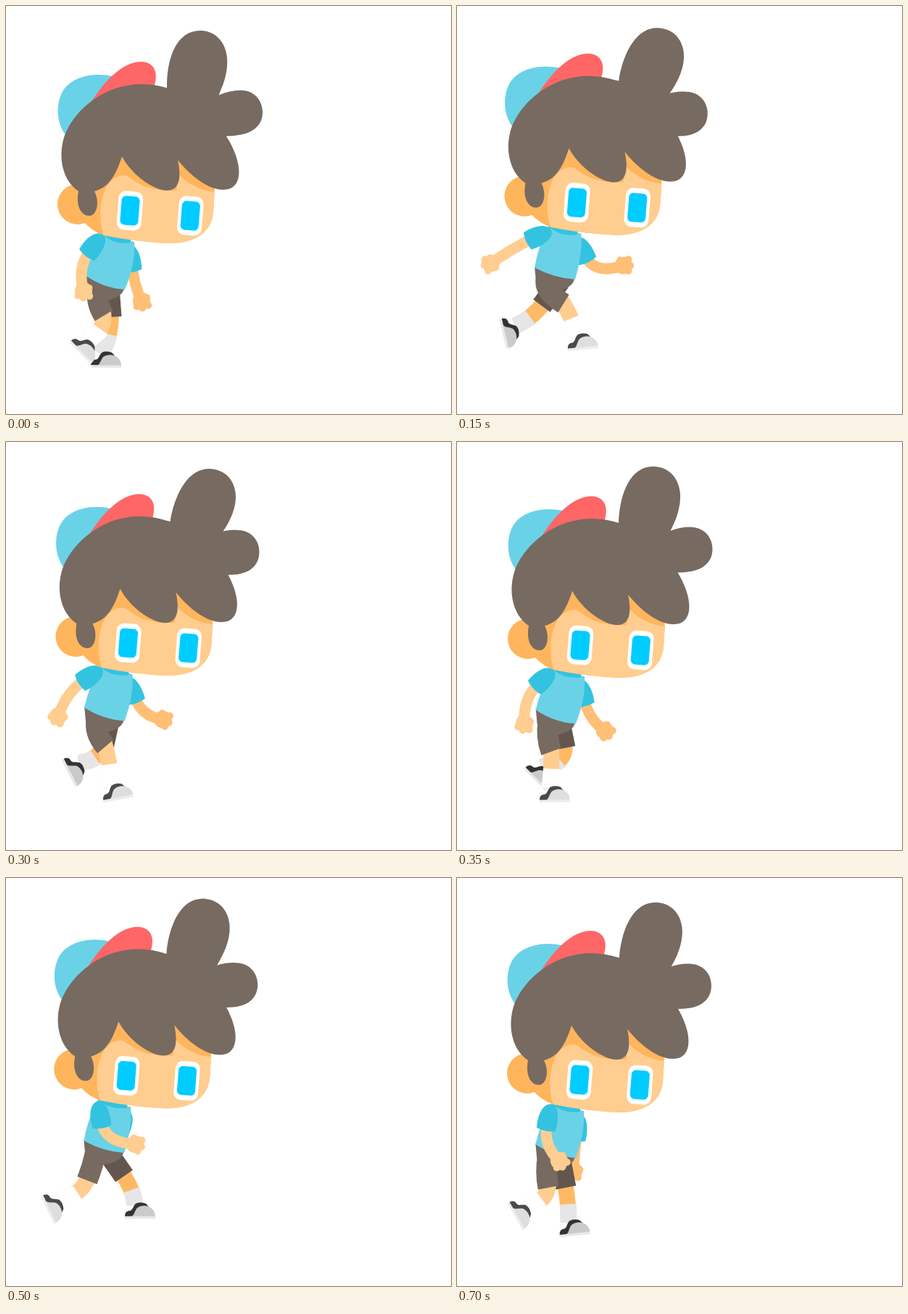
An HTML page with a canvas that plays this animation: 614 px wide and 564 px high, repeating every 0.75 s.

```html
<!DOCTYPE html>
<html lang="en">
<head>
<meta charset="utf-8">
<title>Walk cycle</title>
<style>
  html, body { margin: 0; width: 100%; height: 100%; overflow: hidden; background: #fff; }
  canvas { display: block; }
</style>
</head>
<body>
<canvas id="stage" width="614" height="564"></canvas>
<script>
const ctx = document.getElementById('stage').getContext('2d');
const STEP = 50, STEPS = 15;

const HAIR = '#776a61', SKIN = '#ffcd8f', SHADE = '#ffb55c', BLUE = '#6ad2e7', TEAL = '#33c3e0';
const NEAR = { skin: SKIN, leg: SKIN, shorts: HAIR, sock: '#fff', shoe: '#4a4a4a', toe: '#dedede', sole: '#ededed' };
const FAR = { skin: '#ffbf75', leg: '#ffb964', shorts: '#62564f', sock: '#e6e6e6', shoe: '#333', toe: '#cacaca', sole: '#e8e8e8' };

// Key poses, in steps of the cycle
const KEYS = [0, 2, 3.5, 5, 7, 10, 12, 14];
// rise of the body, sway of the top tuft, sway of the side tuft
const BODY = [
  [0, 0, 0], [8.3, 6.5, 5], [11.8, 13, 7], [9.6, 20, 9],
  [2, 3, 1.5], [9.6, 6.5, 5], [12, 19, 9], [4, 6, 3]
];
// knee x, y; sole x, y, angle
const NEAR_LEG = [
  [135, 428, 102, 480, 46], [143, 414, 153, 480, 5], [148, 411, 180, 474, -9], [144, 412, 171, 485, -14],
  [130, 428, 135, 498, -1], [112, 418, 57, 459, 65], [110, 416, 43.5, 437, 94], [126, 428, 80, 468, 60]
];
const FAR_LEG = [
  [145, 430, 138, 500, 1], [120, 417, 79, 467, 54], [117, 414, 60, 449, 84], [120, 415, 70, 449, 79],
  [149, 423, 107, 467, 45], [163, 412, 185, 471, 0], [164, 412, 206, 471, -18], [150, 428, 163, 494.5, -6]
];
// sleeve angle, hand x, y
const NEAR_ARM = [
  [38, 107, 394], [58, 63, 372], [67, 43, 351], [62, 56, 364],
  [47, 93, 389], [-10, 178, 368], [-20, 189, 350], [12, 141, 391]
];
const FAR_ARM = [
  [-8, 187, 408], [-20, 219, 373], [-28, 232, 355], [-25, 223, 363],
  [-14, 204, 399], [22, 128, 374], [30, 110, 378], [8, 161, 405]
];

const rad = a => a * Math.PI / 180;
const mix = (a, b, k) => a + (b - a) * k;

// Periodic Catmull-Rom through the key poses
function pose(track, t) {
  const n = KEYS.length;
  const time = i => KEYS[(i + n) % n] + Math.floor(i / n) * STEPS;
  let i = n - 1;
  while (KEYS[i] > t) i--;
  const [a, b, c, d] = [-1, 0, 1, 2].map(k => time(i + k));
  const [A, B, C, D] = [-1, 0, 1, 2].map(k => track[(i + k + n) % n]);
  const h = c - b, s = (t - b) / h, s2 = s * s, s3 = s2 * s;
  return B.map((v, j) =>
    (2 * s3 - 3 * s2 + 1) * v + (3 * s2 - 2 * s3) * C[j] +
    h * ((s3 - 2 * s2 + s) * (C[j] - A[j]) / (c - a) + (s3 - s2) * (D[j] - v) / (d - b)));
}

const paths = {};
function fill(color, d) {
  ctx.fillStyle = color;
  ctx.fill(paths[d] || (paths[d] = new Path2D(d)));
}
function ellipse(color, x, y, rx, ry = rx) {
  ctx.fillStyle = color;
  ctx.beginPath();
  ctx.ellipse(x, y, rx, ry, 0, 0, 7);
  ctx.fill();
}
function bend(color, width, x0, y0, cx, cy, x1, y1) {
  ctx.strokeStyle = color;
  ctx.lineWidth = width;
  ctx.beginPath();
  ctx.moveTo(x0, y0);
  ctx.quadraticCurveTo(cx, cy, x1, y1);
  ctx.stroke();
}
function at(x, y, angle, draw) {
  ctx.save();
  ctx.translate(x, y);
  ctx.rotate(rad(angle));
  draw();
  ctx.restore();
}
function around(x, y, angle, draw) {
  at(x, y, angle, () => { ctx.translate(-x, -y); draw(); });
}

function arm(look, x, y, [angle, hx, hy]) {
  const dx = -Math.sin(rad(angle)), dy = Math.cos(rad(angle));
  const cx = x + dx * 54, cy = y + dy * 54;
  bend(look.skin, 15, x + dx * 24, y + dy * 24, cx, cy, hx, hy);
  at(hx, hy, Math.atan2(hy - cy, hx - cx) * 180 / Math.PI, () => {
    ellipse(look.skin, 0, 0, 12.5, 12);
    ellipse(look.skin, 9, -6, 5);
    ellipse(look.skin, 9, 3, 5);
    ellipse(look.skin, 4, 9, 5);
    ellipse(look.skin, -2, -9, 4.5);
  });
  at(x, y, angle, () => fill(TEAL, 'M-13 32C-16 14 -11 -4 1 -4C12 -3 15 18 13 32Q0 36 -13 32Z'));
}

function shoe(look) {
  fill(look.shoe, 'M-21 -3C-21 -9 -18 -11 -14 -11C-10 -12 -10 -17 -6 -21Q0 -24 8 -21L14 -14L0 -3Z');
  fill(look.toe, 'M-12 -3C-8 -5 -8 -10 -4 -15C6 -22 21 -16 21 -3Z');
  fill(look.sole, 'M-21 -3.5H21V0H-21Z');
}

function leg(look, hx, hy, lean, [kx, ky, sx, sy, angle]) {
  const len = Math.hypot(kx - hx, ky - hy);
  const cx = kx + (kx - hx) / len * 22, cy = ky + (ky - hy) / len * 22;
  const s = Math.sin(rad(angle)), c = Math.cos(rad(angle));
  const ax = sx - 7 * c + 19 * s, ay = sy - 7 * s - 19 * c;
  bend(look.leg, 22, kx - (cx - kx) * .3, ky - (cy - ky) * .3, cx, cy, ax, ay);
  // the sock is the lower half of the same curve
  const mx = (kx + 2 * cx + ax) / 4, my = (ky + 2 * cy + ay) / 4;
  bend(look.sock, 23, mx, my, (cx + ax) / 2, (cy + ay) / 2, ax, ay);
  at(sx, sy, angle, () => shoe(look));
  bend(look.shorts, 29, hx, hy, lean === null ? (hx + kx) / 2 : hx + lean, (hy + ky) / 2, kx, ky);
}

function pelvis(d) {
  const lx = 109 - 2 * d, ly = 370 - 10 * d, rx = 163 - d, ry = 390 - 14 * d;
  ctx.fillStyle = HAIR;
  ctx.beginPath();
  ctx.moveTo(lx, ly);
  ctx.lineTo(rx, ry);
  ctx.quadraticCurveTo(rx - 2, ry + 14, rx - 30, ry + 18);
  ctx.lineTo(lx + 2, ly + 22);
  ctx.fill();
}

function shirt(d) {
  const lx = 133 - 8 * d, ly = 316 - 12 * d, rx = 177 - 6 * d, ry = 326 - 12 * d;
  const bx = 109 - 2 * d, by = 372 - 11 * d, ex = 164 - d, ey = 392 - 15 * d;
  ctx.fillStyle = BLUE;
  ctx.beginPath();
  ctx.moveTo(lx, ly);
  ctx.quadraticCurveTo(mix(lx, bx, .55) - 4, mix(ly, by, .5), bx, by);
  ctx.quadraticCurveTo(134, ey - 2, ex, ey);
  ctx.quadraticCurveTo(rx + 2, mix(ry, ey, .45), rx, ry);
  ctx.fill();
  ctx.fillStyle = TEAL;
  ctx.beginPath();
  ctx.moveTo(lx, ly);
  ctx.quadraticCurveTo(lx + 18, ly + 15, rx - 5, ry + 1);
  ctx.lineTo(rx - 5, ry - 6);
  ctx.fill();
}

function eye(x, y) {
  at(x, y, 4.5, () => {
    for (const [color, w, h, r] of [['#fff', 34, 54, 10], ['#0cf', 25, 40, 6]]) {
      ctx.fillStyle = color;
      ctx.beginPath();
      ctx.roundRect(-w / 2, -h / 2, w, h, r);
      ctx.fill();
    }
  });
}

function head(top, side) {
  ellipse(SHADE, 99, 274, 28);
  fill(BLUE, 'M82 178C68 160 69 131 80 115C95 95 125 92 147 97L150 130L90 180Z');
  fill('#f66', 'M118 132C135 105 160 77 187 77C207 78 210 95 204 112L150 135Z');
  fill(SHADE, 'M105 240L109 300Q120 312 135 317Q180 326 225 328C265 328 284 310 286 285L288 250L240 195H160Z');
  fill(SKIN, 'M135 317C125 290 130 235 163 234C177 236 180 256 235 255L238 232Q258 254 288 257L286 285C284 310 265 328 225 328Q180 326 135 317Z');
  eye(171, 283);
  eye(254.3, 290);
  around(235, 150, top, () =>
    fill(HAIR, 'M225 145L222 112C222 70 236 34 268 34C294 34 308 58 305 84C303 104 296 116 293 125L285 155Z'));
  around(205, 130, side, () =>
    fill(HAIR, 'M270 130L294 123Q310 116 325 116.500C342 117 354 130 354 147C354 164 342 174 326 177.500Q314 180 300 180L270 175Z'));
  fill(HAIR, 'M82 176C90 158 102 143 120 130C150 108 188 102 225 114L290 126L304 180C328 218 328 254 300 254C279 254 255 235 237 213C242 236 240 255 222 255C204 255 174 234 160 208C150 240 138 252 122 256C130 272 125 290 115 290C104 290 96 277 100 256C76 240 71 204 82 176Z');
}

function draw(t) {
  const [rise, top, side] = pose(BODY, t), d = rise / 12;
  ctx.fillStyle = '#fff';
  ctx.fillRect(0, 0, 614, 564);
  arm(FAR, 170 - 4 * d, 334 - 11 * d, pose(FAR_ARM, t));
  leg(FAR, 142, 390 - 10 * d, null, pose(FAR_LEG, t));
  leg(NEAR, 127 - 4 * d, 388 - 12 * d, -4, pose(NEAR_LEG, t));
  pelvis(d);
  shirt(d);
  arm(NEAR, 131 - 5 * d, 319 - 8 * d, pose(NEAR_ARM, t));
  ctx.save();
  ctx.translate(-rise / 2, -rise);
  head(top, side);
  ctx.restore();
}

const start = performance.now();
function tick() {
  const elapsed = Math.max(0, performance.now() - start);
  draw(Math.floor(elapsed / STEP) % STEPS);
  requestAnimationFrame(tick);
}
tick();
</script>
</body>
</html>
```
